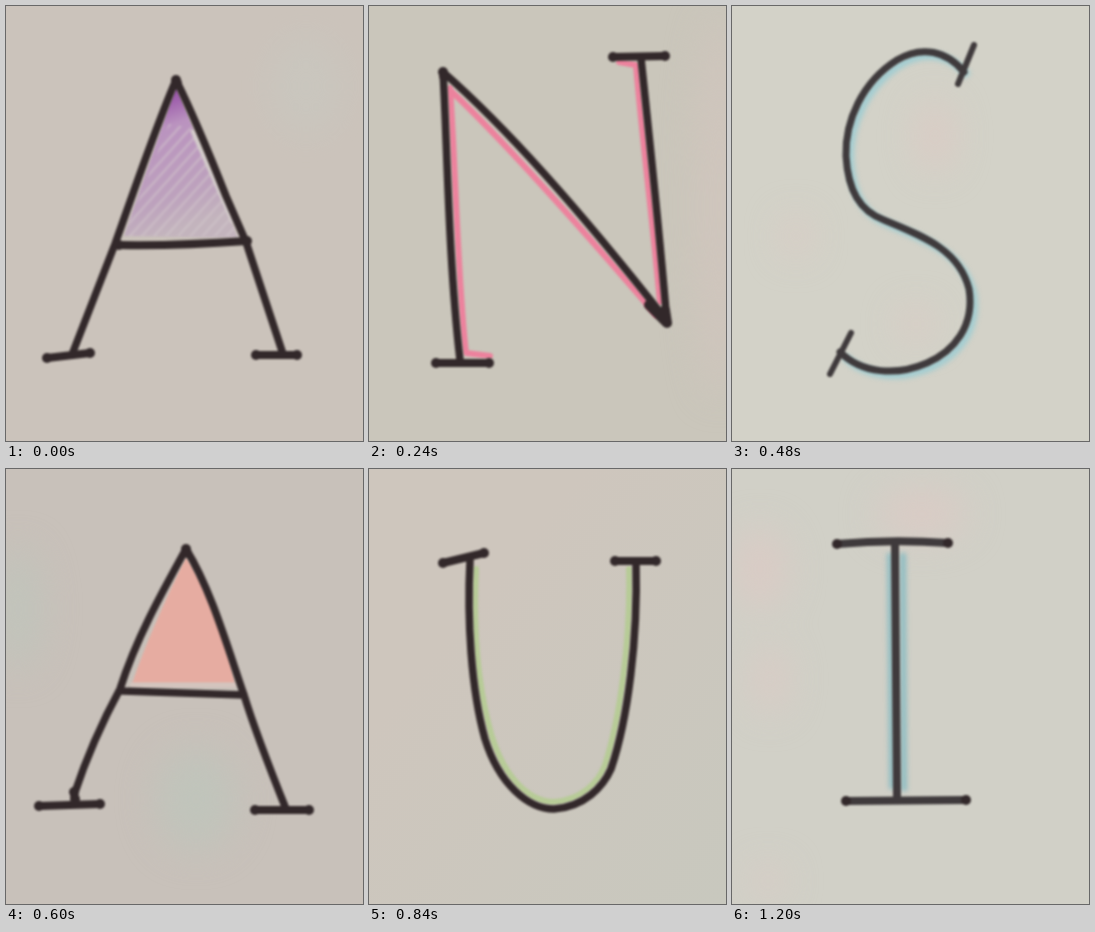
Recreate the animation shown at these times as an HTML page without scripts. Size 357 by 435 pixels, loop 1320 ms.

```html
<!DOCTYPE html>
<html lang="en">
<head>
<meta charset="utf-8">
<title>Hand-drawn letters</title>
<style>
html, body { margin: 0; width: 100%; height: 100%; overflow: hidden; background: #cbc4bc; }
svg { display: block; width: 100%; height: 100%; }
filter { color-interpolation-filters: sRGB; }
.slot { opacity: 0; animation: show 1320ms step-end infinite; animation-delay: calc(var(--i) * 120ms - 1320ms); }
@keyframes show {
  0% { opacity: 1; }
  9.0909% { opacity: 0; }
}
.ink { fill: none; stroke: #32282a; stroke-width: 7.5; stroke-linecap: round; stroke-linejoin: round; filter: url(#pen); }
.soft { stroke: #3f3a3c; stroke-width: 7; }
.knob { stroke-width: 8; marker: url(#dot); }
.tint { fill: none; stroke: currentColor; stroke-width: 6; stroke-linecap: round; stroke-linejoin: round; filter: url(#pen); }
.glow { fill: none; stroke: currentColor; filter: url(#haze); }
.fill { filter: url(#pen); }
.patch { filter: url(#wash); }
</style>
</head>
<body>
<svg viewBox="0 0 357 435" preserveAspectRatio="none">
<defs>
  <filter id="pen" filterUnits="userSpaceOnUse" x="0" y="0" width="357" height="435">
    <feGaussianBlur stdDeviation="1.1"/>
  </filter>
  <filter id="haze" filterUnits="userSpaceOnUse" x="0" y="0" width="357" height="435">
    <feGaussianBlur stdDeviation="2.4"/>
  </filter>
  <filter id="wash" filterUnits="userSpaceOnUse" x="-60" y="-60" width="480" height="560">
    <feGaussianBlur stdDeviation="18"/>
  </filter>
  <marker id="dot" viewBox="-1 -1 2 2" markerWidth="1.25" markerHeight="1.25">
    <circle r="1" fill="#32282a"/>
  </marker>

  <linearGradient id="purple" x1="0" y1="0" x2=".25" y2="1">
    <stop offset="0" stop-color="#873c98"/>
    <stop offset=".2" stop-color="#a164ae"/>
    <stop offset=".34" stop-color="#ba93bf"/>
    <stop offset=".8" stop-color="#bda2bd"/>
    <stop offset="1" stop-color="#c3b4bd"/>
  </linearGradient>
  <radialGradient id="pink" gradientUnits="userSpaceOnUse" cx="122" cy="216" r="120">
    <stop offset="0" stop-color="#f08aab"/>
    <stop offset=".18" stop-color="#e8a9ba"/>
    <stop offset="1" stop-color="#e2b7be"/>
  </radialGradient>
  <pattern id="rise" width="9" height="9" patternUnits="userSpaceOnUse" patternTransform="rotate(-48)">
    <path d="M0 3H9" stroke="#d3c8cc" stroke-width="2.5" opacity=".5"/>
  </pattern>
  <pattern id="fall" width="11" height="11" patternUnits="userSpaceOnUse" patternTransform="rotate(56)">
    <path d="M0 4H11" stroke="#d6cbc7" stroke-width="4" opacity=".65"/>
  </pattern>
  <linearGradient id="dusk" x1="0" y1="0" x2="1" y2="1">
    <stop offset=".3" stop-color="#cec6bd"/>
    <stop offset="1" stop-color="#c8c8be"/>
  </linearGradient>

  <g id="tallA">
    <g class="fill">
      <path d="M170 80L118 230L232 232Z" fill="url(#purple)"/>
      <path d="M163 118L118 230H234L188 122Z" fill="url(#rise)"/>
      <path d="M186 124L227 217" stroke="#d3cbca" stroke-width="4"/>
    </g>
    <g class="ink">
      <path d="M170 74C150 120 128 185 109 238L67 346M170 74C187 108 205 152 220 190L240 236L277 348"/>
      <path class="knob" d="M113 239Q170 240 241 235M41 352L84 347M250 349H291M170 74L171 77"/>
    </g>
  </g>

  <g id="N">
    <path class="tint" d="M81 82C86 150 89 280 97 347L121 350M81 84C130 130 202 210 287 309M250 56L267 59C273 130 282 200 291 296"/>
    <g class="ink">
      <path d="M74 66C78 130 79 250 91 354M74 66C130 115 200 190 298 315M272 52C280 130 288 200 297 305"/>
      <path class="knob" d="M244 51L296 50M67 357H120M74 66L75 70"/>
      <path d="M280 299L298 317L296 304" stroke-width="10"/>
    </g>
  </g>

  <path id="curve" d="M232 66C215 45 190 39 165 54C130 76 113 115 114 150C116 185 128 205 152 214C190 230 227 243 237 283C243 320 222 345 195 357C165 370 130 368 108 346"/>
  <g id="S">
    <use href="#curve" class="glow" stroke-width="8" x="4" y="4"/>
    <g class="ink soft">
      <use href="#curve"/>
      <path d="M242 39L226 78M119 327L98 368" stroke-width="6"/>
    </g>
  </g>

  <g id="wideA">
    <path class="fill" d="M180 88C165 120 143 165 126 215H229C222 175 202 120 180 88Z" fill="#e6aca1"/>
    <path class="fill" d="M124 216H230" stroke="#d4c4bd" stroke-width="5"/>
    <g class="ink">
      <path d="M180 80C155 125 130 170 114 220C95 255 80 290 68 326M180 80C205 120 222 180 238 226C250 265 268 310 280 340M116 222L238 226"/>
      <path class="knob" d="M33 337L94 335M249 341H303M180 80L181 84M68 323L69 330"/>
    </g>
  </g>

  <g id="U">
    <path class="tint" d="M107 100C104 160 109 220 123 268C137 312 162 333 185 333C212 331 229 314 236 296C251 250 262 170 260 100"/>
    <g class="ink">
      <path d="M101 92C98 150 102 220 116 270C130 315 159 340 185 340C215 338 234 318 242 300C259 250 269 170 267 94"/>
      <path class="knob" d="M74 94L115 84M246 92H287"/>
    </g>
  </g>

  <path id="bowl" d="M112 70C145 50 195 55 215 75C240 100 246 140 231 172C210 208 160 232 112 237"/>
  <g id="R">
    <g class="fill">
      <use href="#bowl" fill="url(#pink)"/>
      <use href="#bowl" fill="url(#fall)"/>
      <path d="M117 198L134 224L117 230Z" fill="#f08dad"/>
    </g>
    <g class="ink" style="stroke: #453b3d">
      <use href="#bowl"/>
      <path d="M112 65C112 150 106 240 114 322M112 237C155 250 208 282 249 316"/>
      <path d="M88 325L128 324M240 333L266 299"/>
    </g>
  </g>

  <g id="I">
    <path class="glow" d="M158 84L160 320M171 84L172 322" stroke-width="6"/>
    <g class="ink soft">
      <path d="M163 75L165 330" stroke-width="8"/>
      <path class="knob" d="M105 75Q160 70 216 74M114 332L234 331"/>
    </g>
  </g>

  <g id="paperN">
    <rect width="357" height="435" fill="#cac6bb"/>
    <ellipse class="patch" cx="350" cy="200" rx="22" ry="190" fill="#d0c5bd"/>
  </g>
  <g id="paperS">
    <rect width="357" height="435" fill="#d3d2c8"/>
    <g class="patch" fill="#dccac4">
      <ellipse cx="203" cy="130" rx="16" ry="34"/>
      <ellipse cx="64" cy="230" rx="12" ry="18"/>
      <ellipse cx="184" cy="318" rx="16" ry="14"/>
    </g>
  </g>
  <rect id="paperU" width="357" height="435" fill="url(#dusk)"/>
  <g id="paperR">
    <rect width="357" height="435" fill="#cfcec5"/>
    <ellipse class="patch" cx="355" cy="400" rx="14" ry="50" fill="#dcc8c3"/>
  </g>
</defs>

<g class="slot" style="--i:0">
  <rect width="357" height="435" fill="#cbc3bb"/>
  <ellipse class="patch" cx="300" cy="80" rx="36" ry="50" fill="#c7cbc3" opacity=".4"/>
  <use href="#tallA"/>
</g>
<g class="slot" style="--i:1" color="#e58aa4">
  <use href="#paperN"/>
  <use href="#N" transform="rotate(-3 180 210)"/>
</g>
<g class="slot" style="--i:2" color="#ec829d">
  <use href="#paperN"/>
  <use href="#N"/>
</g>
<g class="slot" style="--i:3" color="#a9c9c4">
  <use href="#paperS"/>
  <use href="#S" transform="rotate(4 180 210)"/>
</g>
<g class="slot" style="--i:4" color="#a3cdd1">
  <use href="#paperS"/>
  <use href="#S"/>
</g>
<g class="slot" style="--i:5">
  <rect width="357" height="435" fill="#c8c1ba"/>
  <g class="patch" fill="#c0c4bb">
    <ellipse cx="12" cy="140" rx="22" ry="60"/>
    <ellipse cx="190" cy="330" rx="40" ry="50"/>
  </g>
  <use href="#wideA"/>
</g>
<g class="slot" style="--i:6" color="#bccba2">
  <use href="#paperU"/>
  <use href="#U" transform="rotate(3 180 210)"/>
</g>
<g class="slot" style="--i:7" color="#b7cb97">
  <use href="#paperU"/>
  <use href="#U"/>
</g>
<g class="slot" style="--i:8">
  <use href="#paperR"/>
  <use href="#R" transform="rotate(-3 180 210)"/>
</g>
<g class="slot" style="--i:9">
  <use href="#paperR"/>
  <use href="#R"/>
</g>
<g class="slot" style="--i:10" color="#8dbcc2">
  <rect width="357" height="435" fill="#d1d0c7"/>
  <g class="patch" fill="#dacbc5">
    <ellipse cx="28" cy="100" rx="26" ry="40"/>
    <ellipse cx="38" cy="210" rx="16" ry="34"/>
    <ellipse cx="190" cy="45" rx="44" ry="24"/>
    <ellipse cx="36" cy="412" rx="16" ry="14"/>
  </g>
  <use href="#I"/>
</g>
</svg>
</body>
</html>
```
